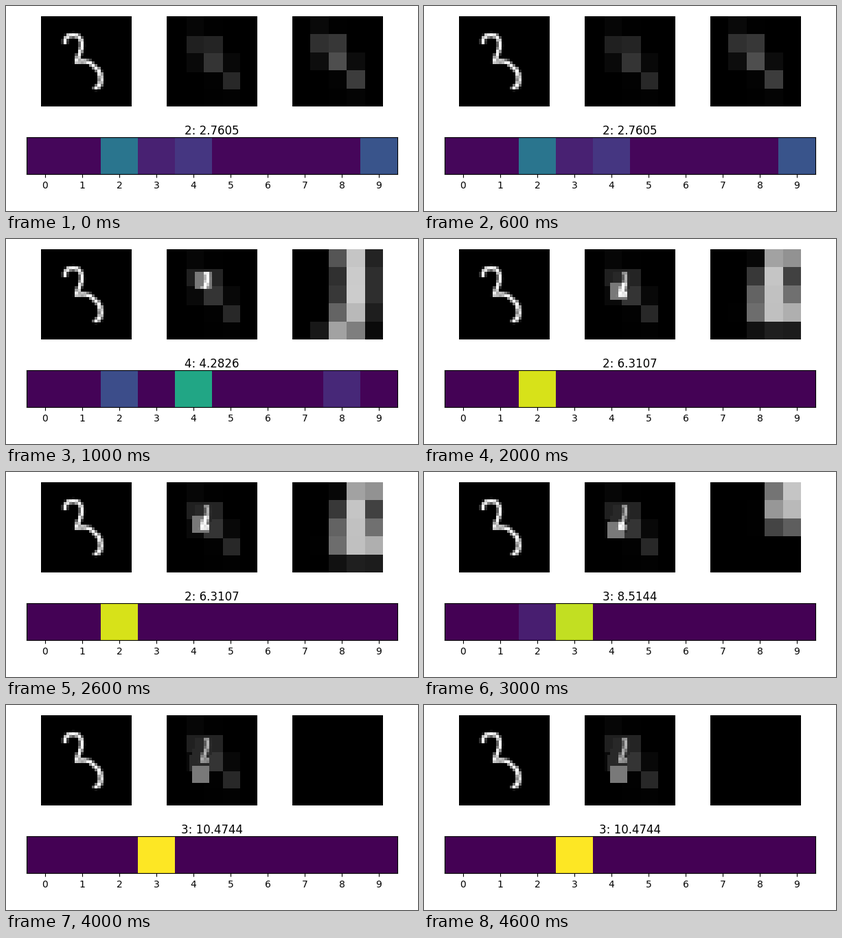
Write a matplotlib script that moves like this. It is 600x300 px and loops after 5000 ms.

```python
import numpy as np
import matplotlib.pyplot as plt
from matplotlib.animation import FuncAnimation

W, H = 600, 300
N = 32      # image side in cells
PATCH = 6   # glimpse side in cells
GRID = 5    # resolution the model sees

# Pen path of the handwritten digit, in cells
STROKE = [(8.5, 9.3), (8.5, 8.2), (9.6, 6.9), (12, 6.6), (13.4, 7.3),
          (14.3, 9), (14.35, 11.2), (13.4, 13.5), (12.6, 16.1), (15, 15.9),
          (17.2, 16.4), (20, 18.9), (21, 20.8), (21.2, 22.8), (20.6, 24.8),
          (19.3, 25.4)]

# Glimpse corner (column, row), score and main class probabilities
STEPS = [
    (None, 2.7605, {2: .39, 9: .26, 4: .16, 3: .09}),
    ((10, 8), 4.2826, {4: .59, 2: .235, 8: .115}),
    ((9, 12), 6.3107, {2: .94}),
    ((8, 14), 8.5144, {3: .91, 2: .085}),
    ((9, 18), 10.4744, {3: 1}),
]


def draw_digit():
    """Rasterise the stroke by distance to its segments."""
    y, x = np.mgrid[:N, :N] + 0.5
    dist = np.full((N, N), np.inf)
    for (x0, y0), (x1, y1) in zip(STROKE, STROKE[1:]):
        dx, dy = x1 - x0, y1 - y0
        t = np.clip(((x - x0) * dx + (y - y0) * dy) / (dx * dx + dy * dy), 0, 1)
        dist = np.minimum(dist, np.hypot(x - x0 - t * dx, y - y0 - t * dy))
    return np.clip(1.2 - dist, 0, 1)


def area_weights(start, size):
    """Share of each image cell in the GRID bins that span start..start+size."""
    edges = start + size * np.arange(GRID + 1)[:, None] / GRID
    cells = np.arange(N)
    overlap = np.minimum(edges[1:], cells + 1) - np.maximum(edges[:-1], cells)
    return np.clip(overlap, 0, None) * GRID / size


def view(k):
    """The whole image or the current glimpse, averaged down to GRID x GRID."""
    corner = STEPS[k][0]
    (col, row), size = (corner, PATCH) if corner else ((0, 0), N)
    return area_weights(row, size) @ digit @ area_weights(col, size).T


def window(k):
    col, row = STEPS[k][0]
    return slice(row, row + PATCH), slice(col, col + PATCH)


def memory(k):
    """Blurred overview with past glimpses and the current one lit up."""
    idx = np.arange(N) * GRID // N
    canvas = 0.68 * view(0)[np.ix_(idx, idx)]
    for past in range(1, k):
        win = window(past)
        canvas[win] = 0.16 + 0.54 * digit[win]
    if k:
        win = window(k)
        canvas[win] = np.clip(0.48 + 0.6 * digit[win], 0, 1)
    return canvas


def probs(k):
    """Main classes as given; the others share what is left."""
    main = STEPS[k][2]
    rest = (1 - sum(main.values())) / (10 - len(main))
    return np.array([[main.get(d, rest) for d in range(10)]])


def add_axes(x, y, w, h):
    return fig.add_axes([x / W, 1 - (y + h) / H, w / W, h / H])


def show(ax, data, cmap):
    return ax.imshow(data, cmap=cmap, vmin=0, vmax=1,
                     interpolation="nearest", aspect="auto")


def add_panel(x, data):
    ax = add_axes(x + 0.1, 15.1, 131.8, 131.8)
    ax.axis("off")
    return show(ax, data, "gray")


digit = draw_digit()
fig = plt.figure(figsize=(W / 100, H / 100), dpi=100)
add_panel(51, digit)
canvas_im = add_panel(234, memory(0))
view_im = add_panel(417, view(0))

bar = add_axes(29.95, 192, 540, 54)
bar_im = show(bar, probs(0), "viridis")
bar.set_xticks(range(10))
bar.set_yticks([])
title = bar.set_title("", fontsize=12, pad=2)


def update(k):
    p = probs(k)
    canvas_im.set_data(memory(k))
    view_im.set_data(view(k))
    bar_im.set_data(p)
    title.set_text(f"{p.argmax()}: {STEPS[k][1]:.4f}")
    return canvas_im, view_im, bar_im, title


anim = FuncAnimation(fig, update, frames=len(STEPS), interval=1000,
                     repeat=True, repeat_delay=0, blit=False)
plt.show()
```
